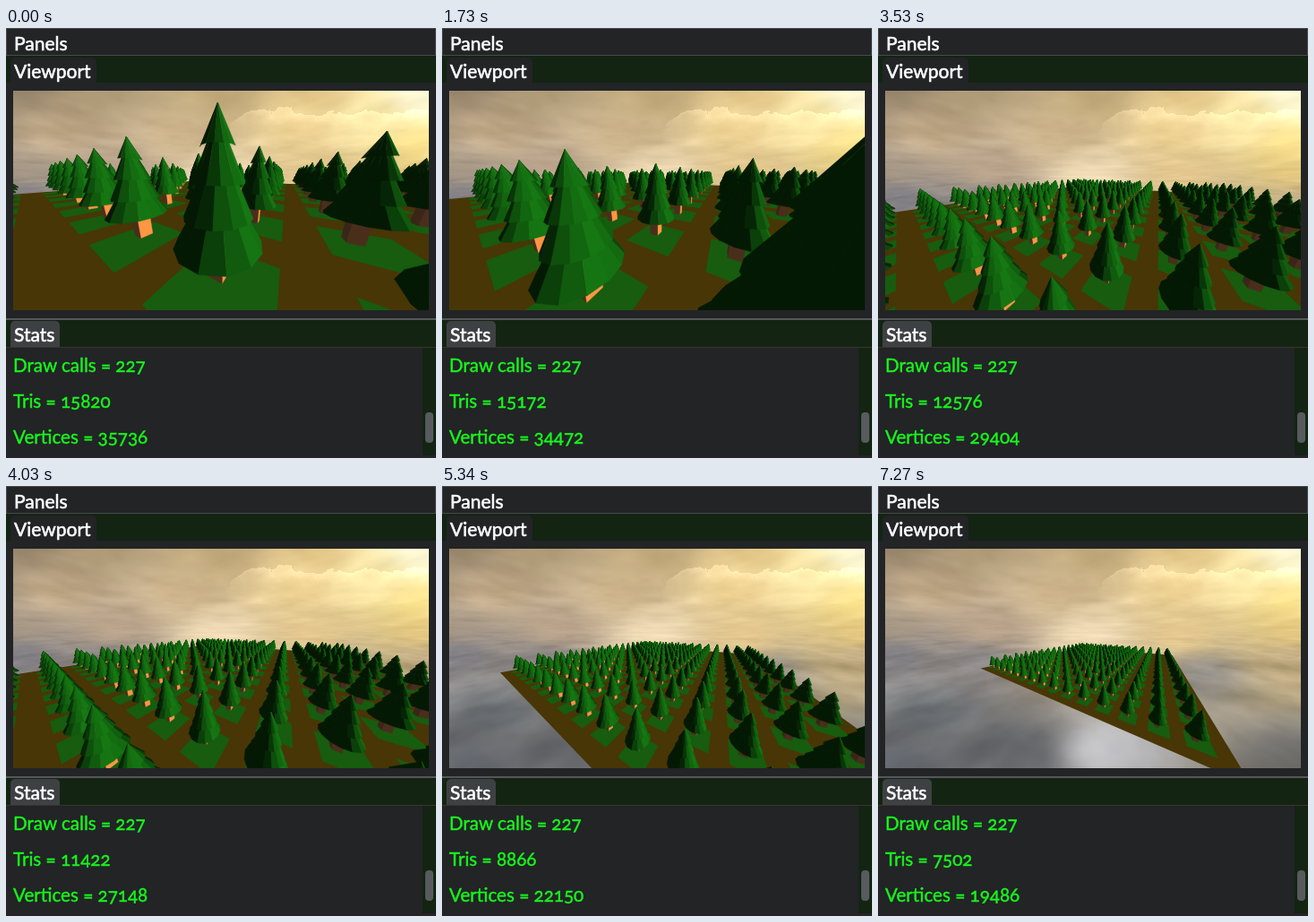
These frames come from a looping animation (480x480 px, 7.29 s). An HTML page with a canvas:

```html
<!DOCTYPE html>
<html lang="en">
<head>
<meta charset="utf-8">
<title>Forest viewport</title>
<style>
html, body { margin: 0; width: 100%; height: 100%; overflow: hidden; background: #222426; }
#stage { position: relative; width: 480px; height: 480px; overflow: hidden; background: #222426; font: 21px Lato, "Open Sans", sans-serif; }
#stage > * { position: absolute; box-sizing: border-box; }
.bar { left: 0; width: 480px; background: #132413; }
.tab { left: 5px; background: #222426; border-radius: 5px 5px 0 0; }
.line { left: 0; width: 480px; height: 1px; background: #55585a; }
.text { white-space: pre; line-height: 26px; color: #fff; -webkit-text-stroke: .6px currentColor; font-variant-numeric: oldstyle-nums; }
.stat { left: 8px; color: #18f51c; font-size: 20.6px; -webkit-text-stroke-width: .45px; }
canvas { left: 8px; top: 70px; }
</style>
</head>
<body>
<div id="stage">
  <div style="left:0;top:0;width:480px;height:31px;border:1px solid #484b4d"></div>
  <div class="text" style="left:9px;top:4px">Panels</div>
  <div class="bar" style="top:31px;height:30px"></div>
  <div class="tab" style="top:33px;width:96px;height:28px"></div>
  <div class="text" style="left:9px;top:35px">Viewport</div>
  <canvas id="view" width="464" height="245"></canvas>
  <div class="line" style="top:324px;height:2px"></div>
  <div class="bar" style="top:326px;height:31px"></div>
  <div class="tab" style="top:327px;width:55px;height:29px;background:#3e4143"></div>
  <div class="text" style="left:9px;top:329px">Stats</div>
  <div class="line" style="top:356px;background:#3d322c"></div>
  <div class="text stat" style="top:363px">Draw calls = 227</div>
  <div class="text stat" style="top:403px" id="tris"></div>
  <div class="text stat" style="top:443px" id="verts"></div>
  <div style="left:465px;top:357px;width:15px;height:120px;background:#132413"></div>
  <div style="left:468px;top:429px;width:9px;height:34px;border-radius:4px;background:#585b5d"></div>
  <div class="line" style="top:478px;height:2px;background:#2a2029"></div>
</div>
<script>
const W = 464, HT = 245, LOOP = 7290, TICK = 100.6;
const ctx = document.getElementById("view").getContext("2d");
const trisEl = document.getElementById("tris"), vertsEl = document.getElementById("verts");
const clamp = (v, lo = 0, hi = 1) => Math.min(hi, Math.max(lo, v));
const mix = (a, b, t) => a + (b - a) * t;

// --- sky: blended tints plus cloud noise, painted once ---
const tints = [
  [0, 0, "9a886e"], [112, 5, "b09b78"], [232, 5, "c2aa7c"], [342, 3, "dfc384"], [457, 3, "fffbd8"],
  [457, 60, "fae28c"], [392, 30, "fcebaa"], [322, 42, "edd192"], [192, 50, "cdb48c"], [52, 50, "c6ae8c"],
  [12, 92, "aa9a86"], [112, 90, "bea78e"], [226, 94, "f4dfba"], [332, 95, "e5c88e"], [457, 95, "e6c87e"],
  [12, 115, "83828a"], [102, 122, "868384"], [352, 140, "8e8a84"], [452, 120, "b8a47e"], [452, 230, "787673"],
  [52, 180, "6b6f73"], [142, 230, "585a5e"], [252, 228, "bebec2"], [12, 240, "5f6268"]
].map(([x, y, c]) => [x, y, ...[0, 2, 4].map(i => parseInt(c.substr(i, 2), 16))]);

function hash(x, y) {
  const n = Math.sin(x * 127.1 + y * 311.7) * 43758.5453;
  return n - Math.floor(n);
}
function noise(x, y) {
  const i = Math.floor(x), j = Math.floor(y);
  const ease = v => v * v * (3 - 2 * v), a = ease(x - i), b = ease(y - j);
  return mix(mix(hash(i, j), hash(i + 1, j), a), mix(hash(i, j + 1), hash(i + 1, j + 1), a), b);
}
function fbm(x, y) {
  let sum = 0;
  for (let o = 0, amp = .5; o < 4; o++, amp /= 2, x *= 2, y *= 2) sum += amp * (noise(x + o * 9, y) - .5);
  return sum;
}
function makeSky() {
  const c = document.createElement("canvas");
  c.width = W; c.height = HT;
  const g = c.getContext("2d"), img = g.createImageData(W, HT);
  for (let y = 0; y < HT; y++) for (let x = 0; x < W; x++) {
    let sum = 0, rgb = [0, 0, 0];
    for (const [tx, ty, ...col] of tints) {
      const dx = (x - tx) * .6, dy = y - ty, w = 1 / (dx * dx + dy * dy + 200) ** 1.6;
      sum += w;
      for (let k = 0; k < 3; k++) rgb[k] += col[k] * w;
    }
    const d = Math.abs(y - 94), below = y > 94;
    const n = fbm((x - 232) / (d + 45) * 2 + (below ? 40 : 10), 400 / (d + 30) + (below ? 30 : 0));
    let light = n * (below ? 65 : 42) * clamp(.4 + d / 60);
    // sunlit cloud bank on the right
    const edge = 40 - 17 * clamp((x - 240) / 25) + 24 * fbm(x / 18, y / 14);
    if (x > 236 && y > edge) light += 24 * Math.exp((edge - y) / 13) * clamp((x - 236) / 20);
    const p = (y * W + x) * 4;
    for (let k = 0; k < 3; k++) img.data[p + k] = rgb[k] / sum + light;
    img.data[p + 3] = 255;
  }
  g.putImageData(img, 0, 0);
  return c;
}
const sky = makeSky();

// --- camera: fixed yaw and pitch, 90 degree field of view ---
const FOCAL = 122.5, SP = .2341, CP = .9722, NEAR = .02, N = 15;
const COS = Math.cos(Math.PI / 6), SIN = .5;
const cam = { r: 0, u: 0, h: 0 };

function toView(r, u, y) {
  const dr = r - cam.r, du = u - cam.u, down = cam.h - y;
  const x = COS * dr + SIN * du, z = COS * du - SIN * dr;
  return [x, down * CP - z * SP, z * CP + down * SP];
}
function clipNear(pts) {
  const out = [];
  pts.forEach((a, i) => {
    const b = pts[(i + 1) % pts.length];
    if (a[2] > NEAR) out.push(a);
    if (a[2] > NEAR !== b[2] > NEAR) {
      const t = (NEAR - a[2]) / (b[2] - a[2]);
      out.push([mix(a[0], b[0], t), mix(a[1], b[1], t), NEAR]);
    }
  });
  return out;
}
function face(pts, color, cull = true) {
  const s = clipNear(pts).map(([x, y, z]) => [W / 2 + FOCAL * x / z, HT / 2 + FOCAL * y / z]);
  if (s.length < 3) return;
  if (cull) {
    let area = 0;
    s.forEach((a, i) => { const b = s[(i + 1) % s.length]; area += a[0] * b[1] - b[0] * a[1]; });
    if (area >= 0) return;
  }
  ctx.beginPath();
  s.forEach(p => ctx.lineTo(p[0], p[1]));
  ctx.closePath();
  ctx.fillStyle = ctx.strokeStyle = color;
  ctx.fill();
  if (cull) ctx.stroke();
}
function square(r0, u0, r1, u1, color) {
  face([toView(r0, u0, 0), toView(r1, u0, 0), toView(r1, u1, 0), toView(r0, u1, 0)], color, false);
}

// --- trees, standing slightly off the middle of their tiles ---
const SIDES = 14, SHIFT = .062;
const tiers = [ // rim height, rim radius, top height, top radius
  [.26, .27, .5, .13], [.43, .205, .68, .09], [.62, .15, .86, .045], [.81, .095, 1.01, 0]
];
const trunkColors = ["#ff9644", "#6a4020", "#3a2618", "#4a2e1c"];

function leafColor(a, i) {
  const lit = clamp(.04 + .78 * (Math.cos(a) + .08 * Math.sin(a)) + (i % 2 ? .03 : -.02));
  return `rgb(${mix(4, 26, lit) | 0},${mix(25, 138, lit) | 0},${mix(4, 22, lit) | 0})`;
}
function ring(r, u, y, radius, sides, turn) {
  return Array.from({ length: sides }, (_, i) => {
    const a = (i / sides) * 2 * Math.PI + turn;
    return toView(r + radius * Math.cos(a), u + radius * Math.sin(a), y);
  });
}
function band(low, high, color) {
  low.forEach((p, i) => {
    const j = (i + 1) % low.length;
    face([p, low[j], high[j], high[i]], color(i));
  });
}
function tree(r, u) {
  const q = -Math.PI / 4;
  band(ring(r, u, 0, .088, 4, q), ring(r, u, .33, .088, 4, q), i => trunkColors[i]);
  tiers.forEach(([y0, r0, y1, r1], k) => {
    const turn = k * .2;
    band(ring(r, u, y0, r0, SIDES, turn), ring(r, u, y1, r1, SIDES, turn),
      i => leafColor((i + .5) / SIDES * 2 * Math.PI + turn, i));
  });
}

// --- motion: the camera backs away along its view line ---
const START = 7, END = 69, TRAVEL = 11, SPEED = .203, RUNUP = 11;
const BRAKE = 2 * (END - START - RUNUP / 2 - TRAVEL / SPEED);
function distance(k) {
  const t = clamp(k, START, END) - START, left = END - START - t;
  if (left < BRAKE) return SPEED * left * left / (2 * BRAKE);
  return TRAVEL - SPEED * (t < RUNUP ? t * t / (2 * RUNUP) : t - RUNUP / 2);
}
const counts = [ // step, triangles, vertices
  [START, 15820, 35736], [17, 15172, 34472], [25, 14622, 33400], [35, 12576, 29404],
  [46, 10038, 24442], [53, 8866, 22150], [END, 7502, 19486]
];
function count(k, col) {
  k = clamp(k, START, END);
  const i = Math.max(1, counts.findIndex(c => c[0] >= k)), a = counts[i - 1], b = counts[i];
  return 2 * Math.round(mix(a[col], b[col], (k - a[0]) / (b[0] - a[0])) / 2);
}

function draw(k) {
  const s = distance(k);
  cam.r = 12.614 - .486 * s;
  cam.u = -3.74 + .842 * s;
  cam.h = 3.13 - .2236 * s;
  ctx.drawImage(sky, 0, 0);
  ctx.lineWidth = .5;
  ctx.lineJoin = "round";
  square(-.69, -.69, N - .31, N - .31, "#483606");
  const trees = [];
  for (let i = 0; i < N; i++) for (let j = 0; j < N; j++) {
    square(i - .31, j - .31, i + .31, j + .31, "#175c0f");
    const r = i - SHIFT, u = j + SHIFT;
    if (toView(r, u, .5)[2] > -.4) trees.push([r, u, Math.hypot(r - cam.r, u - cam.u)]);
  }
  trees.sort((a, b) => b[2] - a[2]).forEach(([r, u]) => tree(r, u));
  trisEl.textContent = "Tris = " + count(k, 1);
  vertsEl.textContent = "Vertices = " + count(k, 2);
}

const begin = performance.now();
let shown = -1;
function tick() {
  const k = Math.floor((performance.now() - begin) % LOOP / TICK);
  if (k !== shown) draw(shown = k);
  requestAnimationFrame(tick);
}
tick();
</script>
</body>
</html>
```
